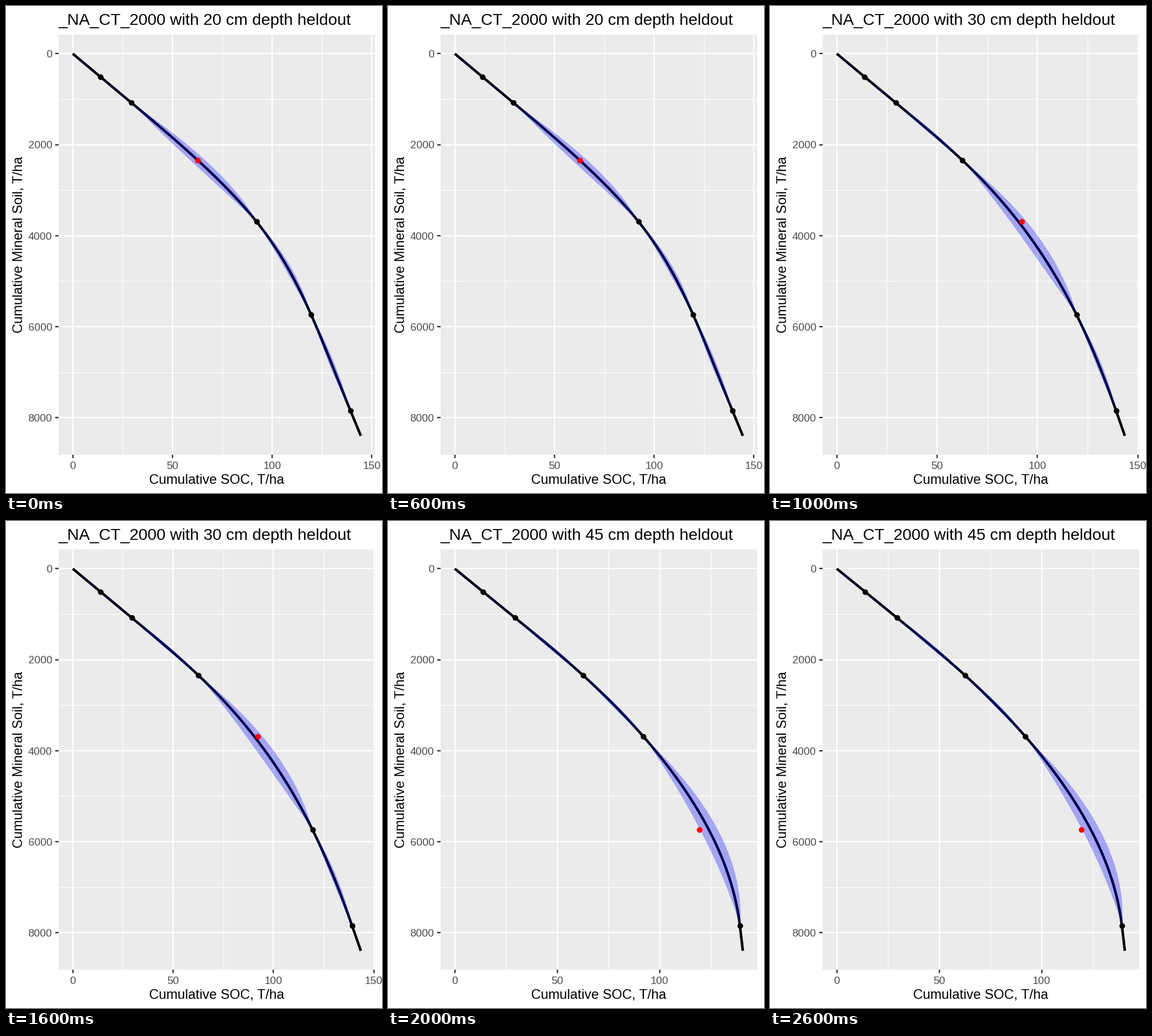
Write a matplotlib script that moves like this. It is 657x852 px and loops after 3 s.

```python
import numpy as np
import matplotlib.pyplot as plt
from matplotlib.animation import FuncAnimation

W, H, DPI = 657, 852, 64
LEFT, RIGHT, TOP, BOTTOM = 91.5, 645.2, 50.0, 785.4
PAD_X, PAD_Y = (RIGHT - LEFT) / 22, (BOTTOM - TOP) / 22
X0, Y0 = LEFT + PAD_X, TOP + PAD_Y
MAX_SOIL = 8400
Y_SCALE = (BOTTOM - PAD_Y - Y0) / MAX_SOIL

SOIL = np.array([0, 510, 1081, 2347, 3690, 5738, 7845], float)
SOC = np.array([0, 13.9, 29.5, 62.7, 92.1, 119.5, 139.2])
HELD_OUT = [(3, 20), (4, 30), (5, 45)]  # (sample index, depth in cm)

plt.rcParams["font.family"] = "Liberation Sans"


def pt(px):
    return px * 72 / DPI


def third_difference(x, y):
    for order in range(1, 4):
        y = np.diff(y) / (x[order:] - x[:-order])
    return y[0]


def knot_slopes(x, y):
    """Slopes of a cubic spline whose ends follow cubics through four points."""
    n = len(x)
    h = np.diff(x)
    s = np.diff(y) / h
    a, b = np.zeros((n, n)), np.zeros(n)
    a[0, :2] = a[-1, -2:] = 1
    b[0] = 2 * s[0] + third_difference(x[:4], y[:4]) * h[0] ** 2
    b[-1] = 2 * s[-1] + third_difference(x[-4:], y[-4:]) * h[-1] ** 2
    for i in range(1, n - 1):
        p, q = 1 / h[i - 1], 1 / h[i]
        a[i, i - 1:i + 2] = p, 2 * (p + q), q
        b[i] = 3 * (s[i - 1] * p + s[i] * q)
    return np.linalg.solve(a, b)


def spline_and_band(x, y, at):
    """Spline values and band half-widths; straight beyond the last knot."""
    m = knot_slopes(x, y)
    i = np.clip(np.searchsorted(x, at, side="right") - 1, 0, len(x) - 2)
    h, dy = x[i + 1] - x[i], y[i + 1] - y[i]
    t = (at - x[i]) / h
    u = 1 - t
    value = (y[i] * (1 + 2 * t) * u ** 2 + h * m[i] * t * u ** 2
             + y[i + 1] * t ** 2 * (3 - 2 * t) - h * m[i + 1] * t ** 2 * u)
    value = np.where(at > x[-1], y[-1] + m[-1] * (at - x[-1]), value)
    half = 4.1 * (np.sqrt(h * dy) / 428) ** 1.5 * 4 * np.clip(t * u, 0, None)
    return value, half


fig = plt.figure(figsize=(W / DPI, H / DPI), dpi=DPI, facecolor="white")
ax = fig.add_axes([0, 0, 1, 1])


def line(xs, ys, width, color, z):
    ax.plot(xs, ys, lw=pt(width), color=color, zorder=z,
            solid_capstyle="butt", solid_joinstyle="round")


def label(x, y, text, size, color="black", ha="center", rotation=0):
    ax.text(x, y, text, fontsize=pt(size), color=color, ha=ha, va="baseline",
            rotation=rotation, rotation_mode="anchor")


def draw(frame):
    ax.clear()
    ax.set(xlim=(0, W), ylim=(H, 0))
    ax.axis("off")

    held, depth = HELD_OUT[frame]
    known = np.arange(len(SOIL)) != held
    soil = np.unique(np.append(np.linspace(0, MAX_SOIL, 601), SOIL))
    soc, half = spline_and_band(SOIL[known], SOC[known], soil)
    x_scale = (RIGHT - PAD_X - X0) / soc.max()

    def px(v):
        return X0 + v * x_scale

    def py(v):
        return Y0 + v * Y_SCALE

    ax.add_patch(plt.Rectangle((LEFT, TOP), RIGHT - LEFT, BOTTOM - TOP,
                               fc="#EBEBEB", lw=0, zorder=0))

    for v in range(0, 151, 25):
        x, major = px(v), v % 50 == 0
        if x > RIGHT:
            continue
        line([x, x], [TOP, BOTTOM], 2.3 if major else 1.15, "white", 1)
        if major:
            line([x, x], [BOTTOM, BOTTOM + 5.9], 2.3, "#333333", 1)
            label(x, 809.8, str(v), 18.9, "#4D4D4D")

    for v in range(0, 8001, 1000):
        y, major = py(v), v % 2000 == 0
        line([LEFT, RIGHT], [y, y], 2.3 if major else 1.15, "white", 1)
        if major:
            line([LEFT - 5.9, LEFT], [y, y], 2.3, "#333333", 1)
            label(80.7, y + 6.8, str(v), 18.9, "#4D4D4D", "right")

    # The translucent band lies over the curve and tints it navy.
    line(px(soc), py(soil), 4.5, "black", 2)
    inside = soil <= SOIL[-1]
    ax.fill_betweenx(py(soil[inside]), px((soc - half)[inside]),
                     px((soc + half)[inside]), color="blue", alpha=0.3,
                     lw=0, zorder=3)

    for i in range(1, len(SOIL)):
        ax.plot(px(SOC[i]), py(SOIL[i]), "o", ms=pt(9.9), mew=0,
                color="red" if i == held else "black", zorder=4)

    label(LEFT, 32.6, f"_NA_CT_2000 with {depth} cm depth heldout", 28.4, ha="left")
    label((LEFT + RIGHT) / 2, 836.2, "Cumulative SOC, T/ha", 23.67)
    label(28.8, (TOP + BOTTOM) / 2, "Cumulative Mineral Soil, T/ha", 23.67, rotation=90)
    return []


anim = FuncAnimation(fig, draw, frames=len(HELD_OUT), init_func=lambda: [],
                     interval=1000, repeat=True, repeat_delay=0)
plt.show()
```
